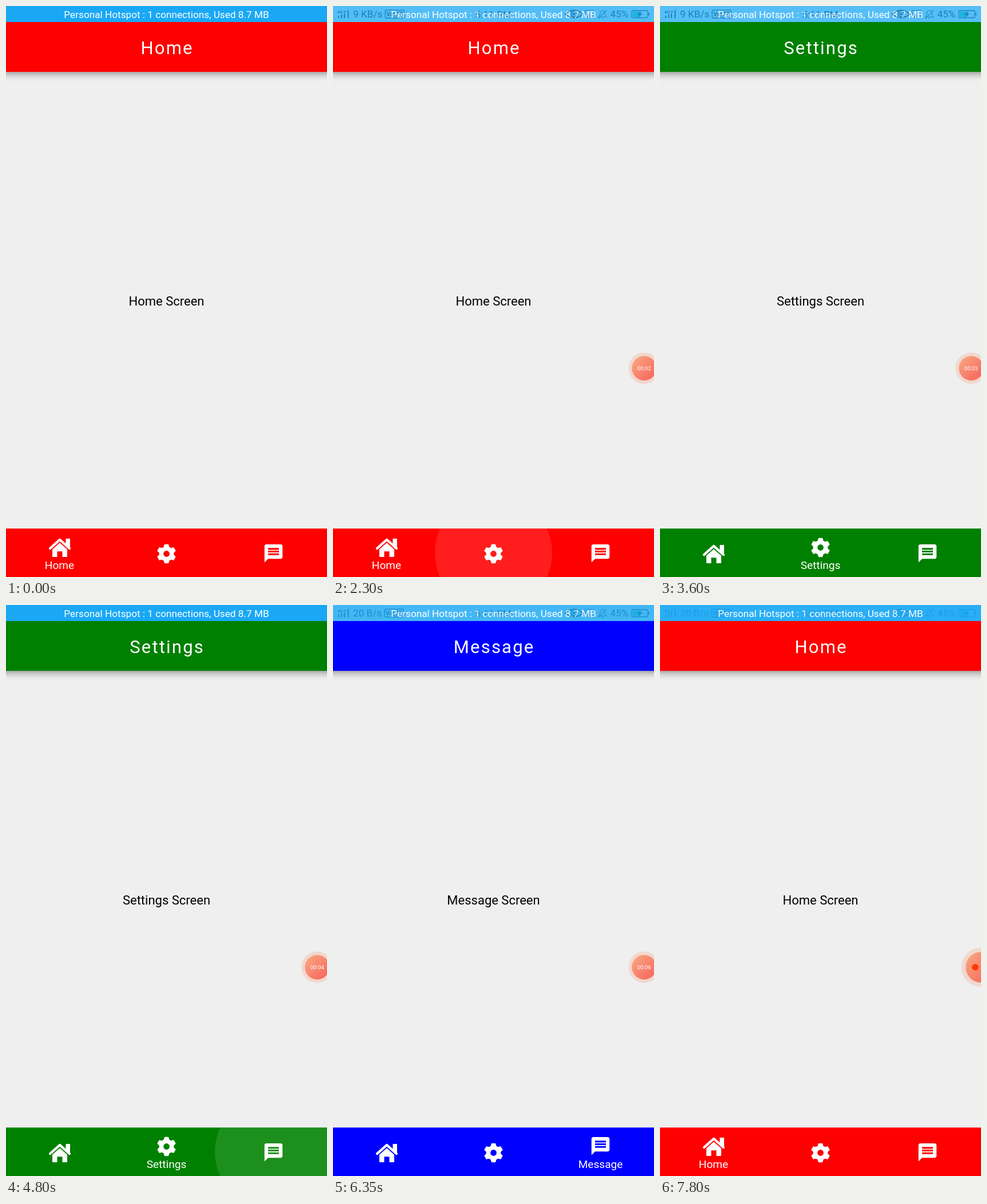
An HTML page for the animation above (7.85 s loop, 561 by 997 pixels).

```html
<!DOCTYPE html>
<html lang="en">
<head>
<meta charset="utf-8">
<title>Bottom tabs</title>
<style>
  html, body { margin: 0; width: 100%; height: 100%; overflow: hidden; background: #efefef; }
  svg { display: block; width: 100vw; height: 100vh; font-family: Roboto, "Open Sans", sans-serif; }
  .mid { text-anchor: middle; }
</style>
</head>
<body>
<svg viewBox="0 0 561 997">
  <defs>
    <linearGradient id="shade" x2="0" y2="1">
      <stop offset="0" stop-opacity=".3"/>
      <stop offset=".35" stop-opacity=".13"/>
      <stop offset=".7" stop-opacity=".03"/>
      <stop offset="1" stop-opacity="0"/>
    </linearGradient>
    <linearGradient id="ember" x2="1" y2="1">
      <stop offset=".1" stop-color="#ff763c"/>
      <stop offset=".85" stop-color="#ff1a0a"/>
    </linearGradient>
    <clipPath id="barClip"><rect y="912.5" width="561" height="84.5"/></clipPath>
  </defs>

  <rect width="561" height="997" fill="#efefef"/>
  <rect y="115" width="561" height="17" fill="url(#shade)"/>
  <rect id="header" y="28" width="561" height="87"/>
  <text id="title" class="mid" x="281.6" y="84" font-size="31" letter-spacing="2.2" fill="#fff"/>
  <text id="content" class="mid" x="280.5" y="523" font-size="22"/>

  <!-- status bar -->
  <rect width="561" height="28" fill="#fff"/>
  <g id="status" font-size="17.2" fill="#111">
    <text x="7.5" y="13" font-size="8" font-weight="500">4G</text>
    <path d="M19 10h4M21 8v4" stroke="#111" fill="none"/>
    <path d="M10 17v4M15 15v6M20 13v8M26.5 7v14" stroke="#111" stroke-width="2"/>
    <text id="speed" x="35" y="20"/>
    <g id="volte">
      <rect x="90.2" y="7.2" width="33" height="13.8" rx="1.5" fill="none" stroke="#222" stroke-width="1.3"/>
      <text class="mid" x="106.7" y="18" font-size="10.2" font-weight="700">VoLTE</text>
    </g>
    <text x="248.5" y="20.5">5:11 PM</text>
    <g fill="none" stroke="#111">
      <path d="M406 14Q421 1 437 14Q421 27 406 14Z" stroke-width="1.8"/>
      <circle cx="421" cy="14" r="4.6" stroke-width="1.8"/>
      <circle cx="421" cy="14" r="1.6" fill="#111"/>
      <path d="M440.5 11V7.5H456V21H451.5M440.5 12.5A8.5 8.5 0 0 1 449 21M440.5 15.5A5.5 5.5 0 0 1 446 21M440.5 18.5A2.5 2.5 0 0 1 443 21" stroke="#444" stroke-width="1.2"/>
      <path d="M464 19Q467 17 467 12Q467 8 471 8Q475 8 475 12Q475 17 478 19ZM469 21H473M478 7L464 22" stroke="#444" stroke-width="1.1"/>
      <rect x="522" y="8" width="28" height="12.5" rx="1.5" stroke="#333" stroke-width="1.3"/>
      <path d="M552 12v4.5" stroke="#333" stroke-width="2"/>
    </g>
    <rect x="523.5" y="9.5" width="13" height="9.5" fill="#2cd9a3"/>
    <path d="M539 9L531 15H535.5L533.5 20L541 13.5H537Z"/>
    <text x="484.5" y="20">45%</text>
  </g>
  <g id="hotspot">
    <rect width="561" height="28" fill="#1aa8f5"/>
    <text class="mid" x="280.5" y="21" font-size="17.2" fill="#fff">Personal Hotspot : 1 connections, Used 8.7 MB</text>
  </g>

  <!-- tab bar -->
  <g clip-path="url(#barClip)">
    <rect id="bar" y="912.5" width="561" height="84.5"/>
    <circle id="reveal" cy="955"/>
    <circle id="press" cy="955" fill="#fff"/>
  </g>
  <g id="tabs" fill="#fff">
    <g>
      <g transform="translate(94 956.5)">
        <path d="M-17 1.6L0 -13.6L17 1.6" fill="none" stroke="#fff" stroke-width="4.2" stroke-linecap="round" stroke-linejoin="round"/>
        <path d="M10.5 -15.5H18V0L10.5 -6Z"/>
        <path d="M0 -8.2L13 3.2V15Q13 16.5 11.5 16.5H4.5V6.8H-4.5V16.5H-11.5Q-13 16.5 -13 15V3.2Z"/>
      </g>
    </g>
    <g>
      <g transform="translate(280.5 956.5)">
        <circle r="9.1" fill="none" stroke="#fff" stroke-width="7.4"/>
        <g id="teeth" stroke="#fff" stroke-linejoin="round"/>
      </g>
    </g>
    <g>
      <path transform="translate(448.6 936.8) scale(1.575)" d="M20 2H4c-1.1 0-2 .9-2 2V22l4-4h14c1.1 0 2-.9 2-2V4c0-1.1-.9-2-2-2zm-2 12H6v-2h12v2zm0-3H6V9h12v2zm0-3H6V6h12v2z"/>
    </g>
  </g>
  <g id="labels" class="mid" font-size="19.1" fill="#fff"/>

  <!-- recorder bubble -->
  <g id="bubble">
    <g id="disc">
      <circle r="34.3" fill="#ff6a30" opacity=".27"/>
      <circle r="26.8" fill="url(#ember)"/>
    </g>
    <text id="clock" class="mid" y="4.4" font-size="12.1" fill="#fff"/>
    <circle id="dot" cx="-10" r="5.8" fill="#ff3a00"/>
  </g>
</svg>
<script>
const LOOP = 7850, STEP = 50;
const TABS = [
  { name: 'Home', color: '#ff0000', x: 93.5 },
  { name: 'Settings', color: '#008000', x: 280.5 },
  { name: 'Message', color: '#0000ff', x: 467.5 },
];
const SWITCHES = [
  { at: 2351, from: 0, to: 1 },
  { at: 4870, from: 1, to: 2 },
  { at: 7182, from: 2, to: 0 },
];
const HOTSPOT_FADES = [2067, 6154];
const FADE = 700, FADE_GAP = 1070;
const BUBBLE = { shown: 350, docked: 2050, stopped: 6900, clockStart: 200 };

const $ = id => document.getElementById(id);
const set = (el, attrs) => { for (const k in attrs) el.setAttribute(k, attrs[k]); };
const clamp = v => Math.min(1, Math.max(0, v));
const cosine = u => (1 - Math.cos(Math.PI * clamp(u))) / 2;
const easeInOut = u => u < .5 ? (2 * u) ** 1.7 / 2 : 1 - (2 - 2 * u) ** 1.7 / 2;

for (let a = 0; a < 360; a += 60)
  $('teeth').innerHTML += `<path transform="rotate(${a})" d="M-5 -10L-3.2 -16.2H3.2L5 -10Z"/>`;
$('labels').innerHTML = TABS.map(t => `<text x="${t.x}" y="983">${t.name}</text>`).join('');

function drawTabs(t) {
  const last = SWITCHES.filter(s => t >= s.at).pop() || { at: -1000, from: 0, to: 0 };
  const tab = TABS[last.to];
  const spread = clamp((t - last.at) / 400);
  const grown = easeInOut(spread);
  set($('header'), { fill: tab.color });
  $('title').textContent = tab.name;
  $('content').textContent = tab.name + ' Screen';
  set($('bar'), { fill: spread < 1 ? TABS[last.from].color : tab.color });
  set($('reveal'), { cx: tab.x, r: 561 * grown, fill: tab.color, opacity: clamp(grown / .3) });

  const moved = easeInOut(clamp((t - last.at) / 150));
  TABS.forEach((_, i) => {
    const active = i === last.to ? moved : i === last.from ? 1 - moved : 0;
    set($('tabs').children[i], { transform: `translate(0 ${-11 * active})` });
    set($('labels').children[i], { opacity: active });
  });
}

function drawPress(t) {
  const tap = SWITCHES.find(s => t >= s.at - 280 && t < s.at + 120);
  if (!tap) return set($('press'), { opacity: 0 });
  const u = clamp((t - tap.at + 280) / 210);
  set($('press'), {
    cx: TABS[tap.to].x,
    r: 102.5 * (1 - (1 - u) ** 2),
    opacity: .115 * (1 - clamp((t - tap.at) / 120)),
  });
}

function drawStatus(t) {
  const hidden = HOTSPOT_FADES.reduce((sum, start) =>
    sum + cosine((t - start) / FADE) - cosine((t - start - FADE_GAP) / FADE), 0);
  set($('hotspot'), { opacity: 1 - hidden });
  const early = t < 4500;
  $('speed').textContent = early ? '9 KB/s' : '20 B/s';
  set($('volte'), { transform: `translate(${early ? 1 : 0} 0)` });
}

function drawBubble(t) {
  const docked = t >= BUBBLE.docked, stopped = t >= BUBBLE.stopped;
  const x = stopped ? 561 : docked ? 543.8 : 526.5;
  const scale = docked && !stopped ? .8 : 1;
  set($('bubble'), {
    transform: `translate(${x} 632.5) scale(${scale})`,
    opacity: t >= BUBBLE.shown ? 1 : 0,
  });
  set($('disc'), { opacity: docked ? .62 : 1 });
  const seconds = Math.max(0, Math.floor((t - BUBBLE.clockStart) / 1000));
  $('clock').textContent = stopped ? '' : '00:0' + seconds;
  set($('dot'), { opacity: stopped ? 1 : 0 });
}

function frame() {
  const t = Math.floor(performance.now() % LOOP / STEP) * STEP;
  drawTabs(t);
  drawPress(t);
  drawStatus(t);
  drawBubble(t);
  requestAnimationFrame(frame);
}
frame();
</script>
</body>
</html>
```
